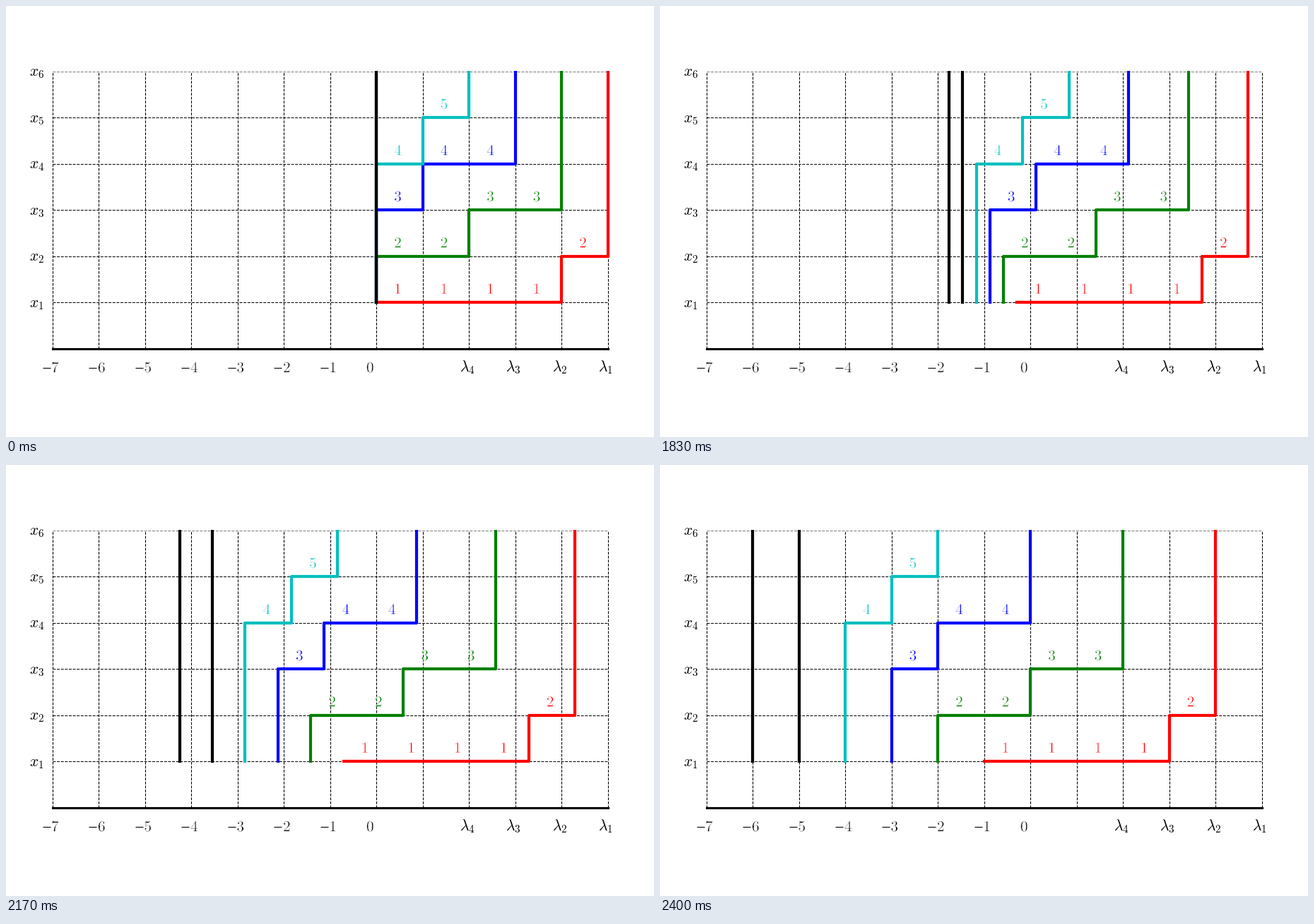
These frames come from a looping animation (917x611 px, 4.03 s). A matplotlib script:

```python
import matplotlib.pyplot as plt
from matplotlib.animation import FuncAnimation
from matplotlib.patches import PathPatch
from matplotlib.path import Path
from matplotlib.textpath import TextPath
from matplotlib.transforms import Affine2D

W, H, DPI = 917, 611, 64
PX = 72 / DPI            # points per pixel
UNIT = W / 14            # pixels per grid cell
EM = 21.4                # font size in pixels
TICK, FRAMES = 10, 403   # ms per frame, frames per loop
START, STEPS = 163, 24   # first moving frame, number of moves
TOP = 6

# Each row of the tableau becomes one lattice path.
ROWS = [
    ("r", [1, 1, 1, 1, 2]),
    ("g", [2, 2, 3, 3]),
    ("b", [3, 4, 4]),
    ("c", [4, 5]),
    ("k", []),
    ("k", []),
]

plt.rcParams["mathtext.fontset"] = "cm"
fig = plt.figure(figsize=(W / DPI, H / DPI), dpi=DPI, facecolor="w")
ax = fig.add_axes([0, 0, 1, 1])
ax.set_xlim(-8, 6)
ax.set_ylim(-0.5, TOP + 0.006)
ax.set_aspect("equal")
ax.axis("off")


def digit(n, cx, y):
    """Outline of a typewriter digit centred on cx with its foot at y."""
    path = TextPath((0, y), rf"$\mathtt{{{n}}}$", size=EM / UNIT)
    box = path.get_extents()
    return path.transformed(Affine2D().translate(cx - (box.x0 + box.x1) / 2, 0))


def add_digits(paths, color, transform):
    # A hairline white edge thins the strokes.
    ax.add_patch(PathPatch(Path.make_compound_path(*paths), fc=color, ec="w",
                           lw=0.42 * PX, zorder=4, transform=transform,
                           clip_on=False))


def label(x, y, text):
    ax.text(x, y, text, fontsize=EM * PX, ha="left", va="baseline")


def lattice(row):
    pts = [(0, 1)]
    for k, r in enumerate(row):
        pts += [(k, r), (k + 1, r)]
    pts.append((len(row), TOP))
    return zip(*pts)


def draw_grid():
    dash = dict(colors="k", linestyles="--", linewidths=1.06 * PX)
    ax.vlines(range(-7, 6), 0, TOP, **dash)
    ax.hlines(range(1, TOP), -7, 5, **dash)
    ax.hlines(TOP, -7, 5, alpha=0.5, clip_on=False, **dash)
    ax.plot([-7, 5], [0, 0], "k", lw=3.1 * PX, solid_capstyle="projecting")

    for i in range(1, TOP + 1):
        label(-7.5, i - 0.1, f"$x_{i}$")
    for i in range(1, 5):
        label(6 - i - 0.2, -0.5, rf"$\lambda_{i}$")

    numbers = [digit(0, -0.133, -0.51)]
    numbers += [digit(n, 0.065 - n, -0.51) for n in range(1, 8)]
    add_digits(numbers, "k", ax.transData)
    for n in range(1, 8):
        ax.hlines(-0.41, -n - 0.21, -n - 0.045, colors="k",
                  linewidths=1.1 * PX, clip_on=False)


def draw_paths():
    moves = []
    for color, row in ROWS:
        move = Affine2D()
        to_screen = move + ax.transData
        xs, ys = lattice(row)
        ax.plot(xs, ys, color=color, lw=4.2 * PX, transform=to_screen,
                solid_capstyle="projecting")
        if row:
            add_digits([digit(r, k + 0.465, r + 0.19) for k, r in enumerate(row)],
                       color, to_screen)
        moves.append(move)
    return moves


draw_grid()
moves = draw_paths()


def update(n):
    # Thirty moves a second; path i slides i cells to the left.
    step = min(max((n - START) * 3 // 10 + 1, 0), STEPS)
    for i, move in enumerate(moves, 1):
        move.clear().translate(-i * step / STEPS, 0)
    return []


anim = FuncAnimation(fig, update, frames=FRAMES, interval=TICK,
                     init_func=lambda: update(0), repeat=True,
                     cache_frame_data=False)
plt.show()
```
